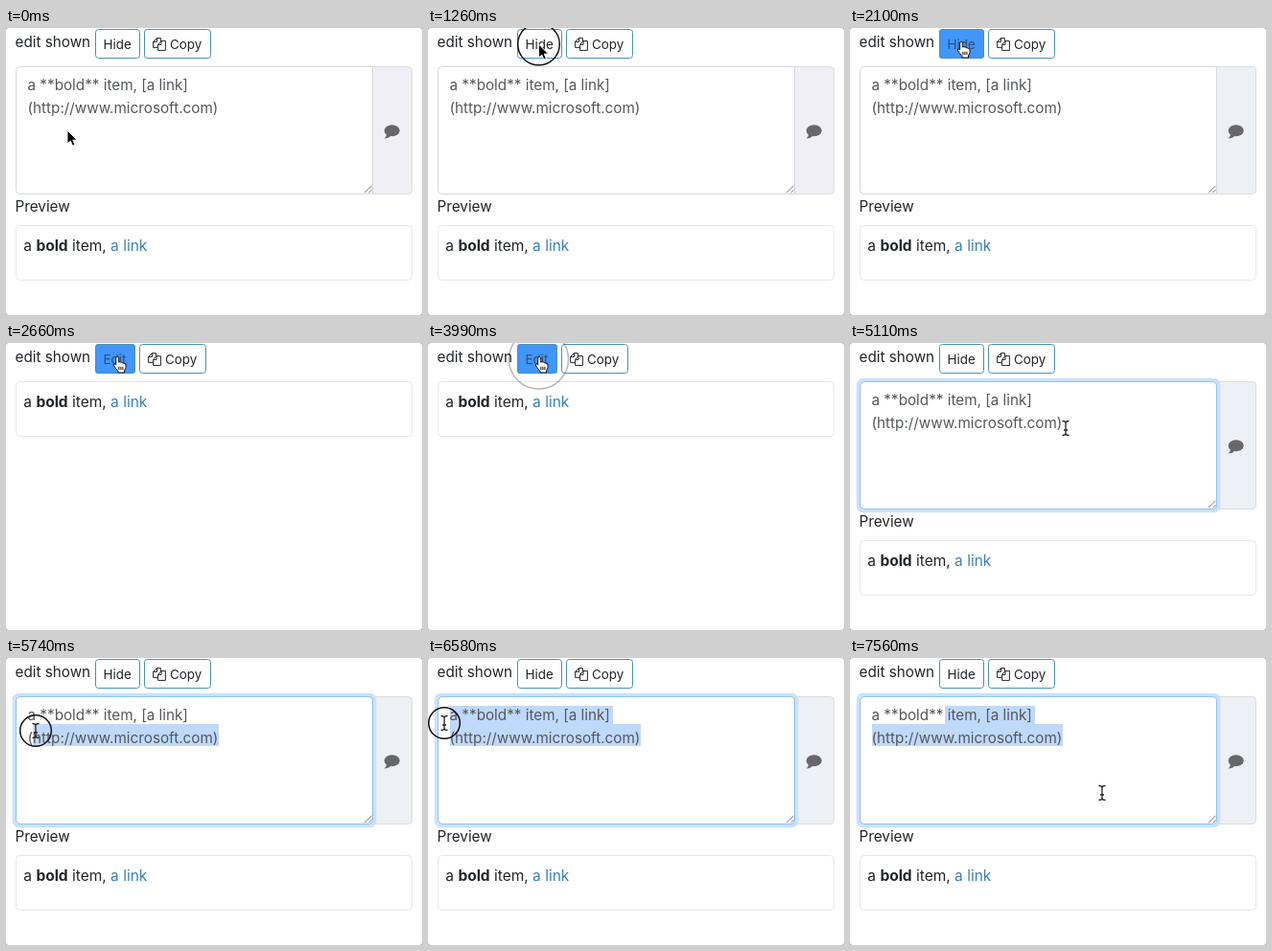
Write an HTML page that moves like this. It is 434 by 300 pixels and loops after 8000 ms.

```html
<!DOCTYPE html>
<html lang="en">
<head>
<meta charset="utf-8">
<title>Markdown editor</title>
<style>
  html, body { margin: 0; width: 100%; height: 100%; overflow: hidden; background: #a5a5a5; }
  svg { display: block; width: 434px; height: 300px; }
  text { font: 15.25px Inter, Roboto, sans-serif; fill: #212529; white-space: pre; }
  .small { font-size: 13.4px; }
  .source { fill: #54585c; }
  .rendered { font-size: 15.5px; }
  .outline { fill: none; stroke: #4a90b8; }
  .selection { fill: #bfd9fc; }
</style>
</head>
<body>
<svg viewBox="0 0 434 300">
  <rect width="434" height="300" rx="3" fill="#fff"/>
  <text x="9.5" y="20">edit shown</text>

  <rect id="hover" x="93" y="1" width="47" height="31" rx="3.5" fill="#4096fb"/>
  <rect id="toggle" class="outline" x="93.5" y="1.5" width="46" height="30" rx="3"/>
  <text id="label" class="small" x="101.5" y="22">Hide</text>

  <g id="copy">
    <rect class="outline" x="144.5" y="1.5" width="69" height="30" rx="3"/>
    <path transform="translate(153 10)" fill="none" stroke="#212529"
      d="M8.4 4V.6H4.5L.6 4.4V10.4H5.5M4.5 .6V4.4H.6M9 3.6H13.4V13.4H5.6V7.4L9 3.6V7.4H5.6"/>
    <text class="small" x="171" y="22">Copy</text>
  </g>

  <g id="editor">
    <path id="addon" d="M382.5 40.5H419.5q4 0 4 4V169.5q0 4-4 4H382.5z" stroke="#d9dce0"/>
    <ellipse cx="402.7" cy="107.2" rx="8" ry="6" fill="#67666b"/>
    <path d="M397 110q0 4-2.5 5.5q5 0 7-3z" fill="#67666b"/>
    <path d="M382.5 40.5H14.5q-4 0-4 4V169.5q0 4 4 4H382.5z" fill="#fff" stroke="#d5d9de"/>
    <g id="focus" fill="none">
      <rect x="8.4" y="38.4" width="376.2" height="137.2" rx="5" stroke="#c9e2fc" stroke-width="3.4"/>
      <rect x="10.5" y="40.5" width="372" height="133" rx="4" stroke="#8fc3f8"/>
    </g>
    <rect id="selection1" class="selection" y="50" height="19"/>
    <rect id="selection2" class="selection" y="69" height="23"/>
    <text class="source" x="22.5" y="65">a **bold** item, [a link]</text>
    <text class="source" x="22.5" y="89">(http://www.microsoft.com)</text>
    <path id="caret" d="M222.5 75V92" stroke="#495057"/>
    <path d="M374 172.3L381.5 164.8M378.5 172.3L381.5 169.3" stroke="#777"/>
    <text x="9.5" y="192">Preview</text>
  </g>

  <g id="card">
    <rect x="10.5" y="206.5" width="413" height="57" rx="4" fill="#fff" stroke="#e5e7e9"/>
    <text class="rendered" x="18.3" y="233">a <tspan font-weight="700">bold</tspan> item, <tspan fill="#3d80b6">a link</tspan></text>
  </g>

  <circle id="ring" fill="none" stroke="#111" stroke-width="1.5"/>
  <g id="pointer">
    <path id="arrow" d="M0 0V14L3.3 11 5.4 16 7.8 15 5.7 10.1H10Z" fill="#000" stroke="#fff" stroke-width=".9"/>
    <path id="hand" transform="translate(-.8 -.3)" fill="#fff" stroke="#111" stroke-linejoin="round"
      d="M0-1.5q1.5-2 3 0v5l1-.6 2 .6 .6.5 2 .3 .5.8 1.2.2q.8 4-1.5 7v2h-6.5v-1.5q-3-3.2-5-6.6 1-2 2.7 0zM3.2 8v3.5M5.2 8v3.5M7.2 8v3.5"/>
    <path id="beam" fill="none" stroke="#222" stroke-width="1.3" d="M-3.5-7.5Q0-7.5 0-5.5Q0-7.5 3.5-7.5M0-6V6M-3.5 7.5Q0 7.5 0 5.5Q0 7.5 3.5 7.5M-2 2H2"/>
  </g>
</svg>
<script>
const LOOP = 8000, STEP = 70;
const el = {};
document.querySelectorAll('[id]').forEach(node => el[node.id] = node);

// Pointer path: [time, x, y]
const path = [
  [210, 64, 107], [420, 76, 92], [700, 112, 50], [840, 123, 24], [980, 115.5, 17],
  [4410, 115.5, 17], [4550, 130, 24], [4760, 180, 52], [4970, 222, 85], [5110, 225, 89],
  [5320, 225, 89], [5460, 185, 86], [5740, 31, 76], [5880, 31, 76], [5950, 17, 77],
  [6090, 114, 78], [6440, 114, 78], [6580, 17, 68], [6650, 55, 53], [6720, 99, 58],
  [7210, 99, 58], [7350, 150, 84], [7560, 263, 141]
];

const within = (t, from, to) => t >= from && t < to;
const ramp = (t, from, length) => Math.min(1, Math.max(0, (t - from) / length));
const show = (node, visible) => node.style.display = visible ? '' : 'none';
const set = (node, attrs) => {
  for (const name in attrs) node.setAttribute(name, attrs[name]);
};

function pointerAt(t) {
  const next = path.findIndex(point => point[0] > t);
  if (next === 0) return path[0].slice(1);
  if (next < 0) return path[path.length - 1].slice(1);
  const [t0, x0, y0] = path[next - 1], [t1, x1, y1] = path[next];
  const k = (t - t0) / (t1 - t0);
  return [x0 + (x1 - x0) * k, y0 + (y1 - y0) * k];
}

function ringAt(t) {
  if (within(t, 1260, 1470)) return [21.8, 1];
  for (const click of [2170, 3920]) {
    if (within(t, click, click + 140)) {
      const k = (t - click) / STEP;
      return [24 + 7 * k, 0.7 - 0.4 * k];
    }
  }
  return within(t, 5390, 7280) ? [16.3, 1] : [0, 0];
}

function drawSelection(t, x, y) {
  const selecting = t >= 5390;
  const upper = selecting && (t >= 6720 || y < 70);
  const start = t >= 6720 ? 99 : Math.max(23, upper ? x : x - 3);
  const lower = upper ? 23 : start;
  show(el.selection1, upper);
  show(el.selection2, selecting);
  set(el.selection1, { x: start, width: Math.max(0, 193 - start) });
  set(el.selection2, { x: lower, width: Math.max(0, 222 - lower) });
}

function draw(t) {
  const [x, y] = pointerAt(t);
  const closed = within(t, 2520, 4200);
  const hover = ramp(t, 1470, 150) * (1 - ramp(t, 4480, 150));

  set(el.toggle, { width: closed ? 41 : 46 });
  set(el.hover, { width: closed ? 42 : 47, opacity: hover });
  el.label.textContent = closed ? 'Edit' : 'Hide';
  el.label.style.fill = hover > 0.5 ? '#2d4f7b' : '#212529';
  set(el.copy, { transform: `translate(${closed ? -5 : 0} 0)` });
  set(el.card, { transform: `translate(0 ${closed ? -166 : 0})` });
  show(el.editor, !closed);
  set(el.addon, { fill: t < 2100 ? '#f0eff5' : '#edf0f4' });
  set(el.focus, { opacity: ramp(t, 4130, 150) });
  show(el.caret, within(t, 4270, 4760) || within(t, 5250, 5390));
  drawSelection(t, x, y);

  const [r, opacity] = ringAt(t);
  set(el.ring, { cx: x, cy: y, r, opacity });
  set(el.pointer, { transform: `translate(${x} ${y})` });
  const shape = t < 1540 ? 'arrow' : y < 32 && x < 140 ? 'hand' : y < 40 ? 'arrow' : 'beam';
  for (const name of ['arrow', 'hand', 'beam']) show(el[name], name === shape);
}

const began = performance.now();
function tick() {
  const t = (performance.now() - began) % LOOP;
  draw(Math.floor(t / STEP) * STEP);
  requestAnimationFrame(tick);
}
tick();
</script>
</body>
</html>
```
